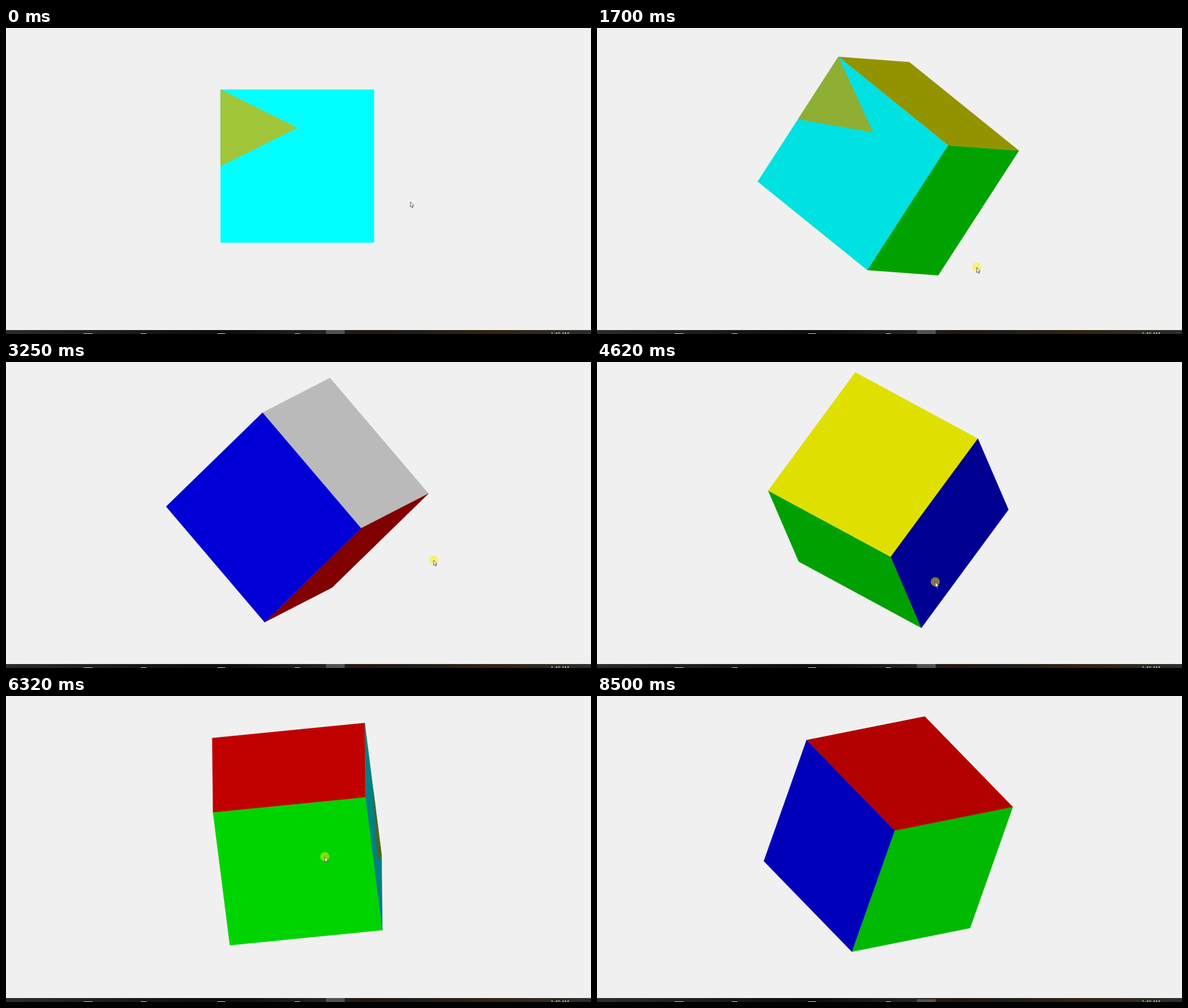
Animation of 1033 by 542 pixels, one loop 8.57 s. Source, as an HTML page with a canvas:

```html
<!DOCTYPE html>
<html lang="en">
<head>
<meta charset="utf-8">
<title>Dragged cube</title>
<style>
html, body { margin: 0; width: 100%; height: 100%; overflow: hidden; background: #f0f0f0; }
canvas { position: absolute; left: 0; top: 0; }
.bar {
  position: absolute; left: 0; top: 535px; width: 1033px; height: 7px; overflow: hidden;
  background: linear-gradient(90deg, #2e2c29, #11120f 30%, #0d0e0c 38%, #24231f 54%,
    #26150f 61%, #1e1d1a 70%, #35230f 83%, #2b2e2d);
}
.bar i { position: absolute; top: 6px; height: 2px; background: #d8d8d8; }
.bar b { position: absolute; left: 565px; width: 33px; height: 7px; background: #515151;
  animation: dim 8570ms step-end infinite; }
.bar span { position: absolute; left: 962px; top: 2.5px; font: 8.5px/10px "Open Sans", sans-serif; color: #fff; }
@keyframes dim { 0% { top: 0; } 99.18% { top: 2px; } }
</style>
</head>
<body>
<canvas id="stage" width="1033" height="542"></canvas>
<div class="bar">
  <b></b>
  <i style="left:137px;width:16px"></i><i style="left:238px;width:10px"></i>
  <i style="left:373px;width:14px"></i><i style="left:510px;width:9px"></i>
  <span>1:40 AM</span>
</div>
<script>
const LOOP = 8570, CX = 514.4, CY = 244.6, HALF = 135.5;
const TURN = 0.38 * Math.PI / 180; // radians per dragged pixel
const WAIT = 100, GLIDE = 250;     // free pointer move between two drags
const ctx = document.getElementById('stage').getContext('2d');

// Orientation (vector part of a unit quaternion) and light direction at the key poses
const pose = (turn, light) => ({ q: [Math.sqrt(1 - dot(turn, turn)), ...turn], light });
const dot = (a, b) => a.reduce((s, v, i) => s + v * b[i], 0);
const rest = pose([0, 0, 0], [0, 0, 1]);
const cyanSide = pose([.0566, -.2339, -.2989], [.065, .041, .94]);
const blueSide = pose([-.3482, .9018, .0274], [.131, .044, .919]);
const yellowSide = pose([.3091, -.782, -.4153], [-.141, -.05, .92]);
const redSide = pose([-.6828, .3167, -.5309], [.015, .38, .896]);
const greenSide = pose([-.3387, -.0686, -.9262], [.158, .066, .945]);
const corner = pose([-.8637, .2518, -.387], [.025, -.008, .918]);

// Each stroke is one drag: time, pointer x, y, pose reached there
const strokes = [
  [[0, 714, 308, rest]],
  [[230, 709, 304, rest], [740, 484, 320], [1100, 500, 405], [1700, 670, 424, cyanSide], [2050, 868, 465]],
  [[2630, 490, 305], [3250, 755, 351, blueSide], [3470, 777, 348]],
  [[3860, 391, 312], [4620, 598, 390, yellowSide], [5310, 111, 237, redSide], [5620, 114, 172]],
  [[6100, 615, 301], [6940, 417, 240, greenSide], [7470, 695, 317, corner]],
  [[LOOP, 980, 545, corner]]
];

const faces = [
  [0, 1, [0, 255, 0]], [0, -1, [255, 255, 255]],
  [1, 1, [255, 255, 0]], [1, -1, [255, 0, 0]],
  [2, 1, [0, 255, 255]], [2, -1, [0, 0, 255]]
];

const mix = (a, b, f) => a + (b - a) * f;
const conj = ([w, x, y, z]) => [w, -x, -y, -z];
const mul = ([a, b, c, d], [e, f, g, h]) => [
  a * e - b * f - c * g - d * h, a * f + b * e + c * h - d * g,
  a * g - b * h + c * e + d * f, a * h + b * g - c * f + d * e
];
const rotate = (q, v) => mul(mul(q, [0, ...v]), conj(q)).slice(1);

function slerp(a, b, f) {
  const angle = Math.acos(Math.max(-1, Math.min(1, dot(a, b)))), s = Math.sin(angle);
  if (s < 1e-4) return a;
  return a.map((v, i) => (v * Math.sin((1 - f) * angle) + b[i] * Math.sin(f * angle)) / s);
}

function dragTurn(dx, dy) {
  const d = Math.hypot(dx, dy);
  if (!d) return [1, 0, 0, 0];
  const s = Math.sin(d * TURN / 2) / d;
  return [Math.cos(d * TURN / 2), s * dy, s * dx, 0];
}

// Join the strokes into one pointer path with a glide in every gap
function joinStrokes() {
  const path = [];
  strokes.forEach((stroke, n) => {
    stroke.forEach(([t, x, y, key], i) => path.push({ t, x, y, key, down: i < stroke.length - 1 }));
    if (n === strokes.length - 1) return;
    const end = path[path.length - 1], [start, x, y] = strokes[n + 1][0];
    path.push({ ...end, t: end.t + WAIT, key: null });
    path.push({ t: Math.min(end.t + WAIT + GLIDE, start - 1), x, y, down: false });
  });
  return path;
}

// Roll the cube along the drags, then spread the small drift over each stretch
function rollCube(path) {
  let from = 0;
  path[0].q = rest.q;
  path[0].dist = 0;
  for (let i = 1; i < path.length; i++) {
    const a = path[i - 1], b = path[i];
    const dx = a.down * (b.x - a.x), dy = a.down * (b.y - a.y);
    b.q = mul(dragTurn(dx, dy), a.q);
    b.dist = a.dist + Math.hypot(dx, dy);
    if (!b.key) continue;
    let drift = mul(b.key.q, conj(b.q));
    if (drift[0] < 0) drift = drift.map(v => -v);
    const start = path[from].dist, length = b.dist - start || 1;
    for (let k = from + 1; k <= i; k++) {
      path[k].q = mul(slerp([1, 0, 0, 0], drift, (path[k].dist - start) / length), path[k].q);
    }
    from = i;
  }
}

function span(list, t) {
  let i = 0;
  while (i < list.length - 2 && list[i + 1].t <= t) i++;
  const a = list[i], b = list[i + 1];
  return { a, b, f: (t - a.t) / (b.t - a.t) };
}

function polygon(points, color) {
  ctx.beginPath();
  points.forEach(([x, y]) => ctx.lineTo(CX + x * HALF, CY - y * HALF));
  ctx.closePath();
  ctx.fillStyle = ctx.strokeStyle = color;
  ctx.lineWidth = 0.4;
  ctx.fill();
  ctx.stroke();
}

function drawCube(q, light) {
  for (const [axis, sign, color] of faces) {
    const at = (u, v) => {
      const p = [0, 0, 0];
      p[axis] = sign;
      p[(axis + 1) % 3] = u;
      p[(axis + 2) % 3] = v;
      return rotate(q, p);
    };
    const normal = at(0, 0);
    if (normal[2] < 0.001) continue;
    const shade = Math.min(1, 0.4 + 0.6 * Math.max(0, dot(normal, light)));
    const paint = c => `rgb(${c.map(v => Math.round(v * shade))})`;
    polygon([at(-1, -1), at(1, -1), at(1, 1), at(-1, 1)], paint(color));
    if (axis === 2 && sign > 0) {
      polygon([at(-1, 1), at(-1, 0), at(0, 0.5)], paint([162, 198, 57]));
    }
  }
}

const arrow = new Path2D('M0 0V9.2L2.1 7.3L3.5 10.6L4.9 10L3.5 6.8H6.2Z');

function drawPointer(x, y, down) {
  if (down) {
    ctx.fillStyle = 'rgba(255,240,0,.5)';
    ctx.beginPath();
    ctx.arc(x, y - 0.5, 8, 0, 2 * Math.PI);
    ctx.fill();
  }
  ctx.save();
  ctx.translate(x, y);
  ctx.fillStyle = '#fff';
  ctx.strokeStyle = '#333';
  ctx.lineWidth = 0.8;
  ctx.fill(arrow);
  ctx.stroke(arrow);
  ctx.restore();
}

const path = joinStrokes();
rollCube(path);
const lights = path.filter(p => p.key);

function draw(now) {
  const t = now % LOOP;
  const { a, b, f } = span(path, t);
  const lit = span(lights, t);
  const light = lit.a.key.light.map((v, i) => mix(v, lit.b.key.light[i], lit.f));
  ctx.clearRect(0, 0, 1033, 542);
  drawCube(slerp(a.q, b.q, f), light);
  drawPointer(mix(a.x, b.x, f), mix(a.y, b.y, f), a.down);
  requestAnimationFrame(draw);
}

requestAnimationFrame(draw);
</script>
</body>
</html>
```
